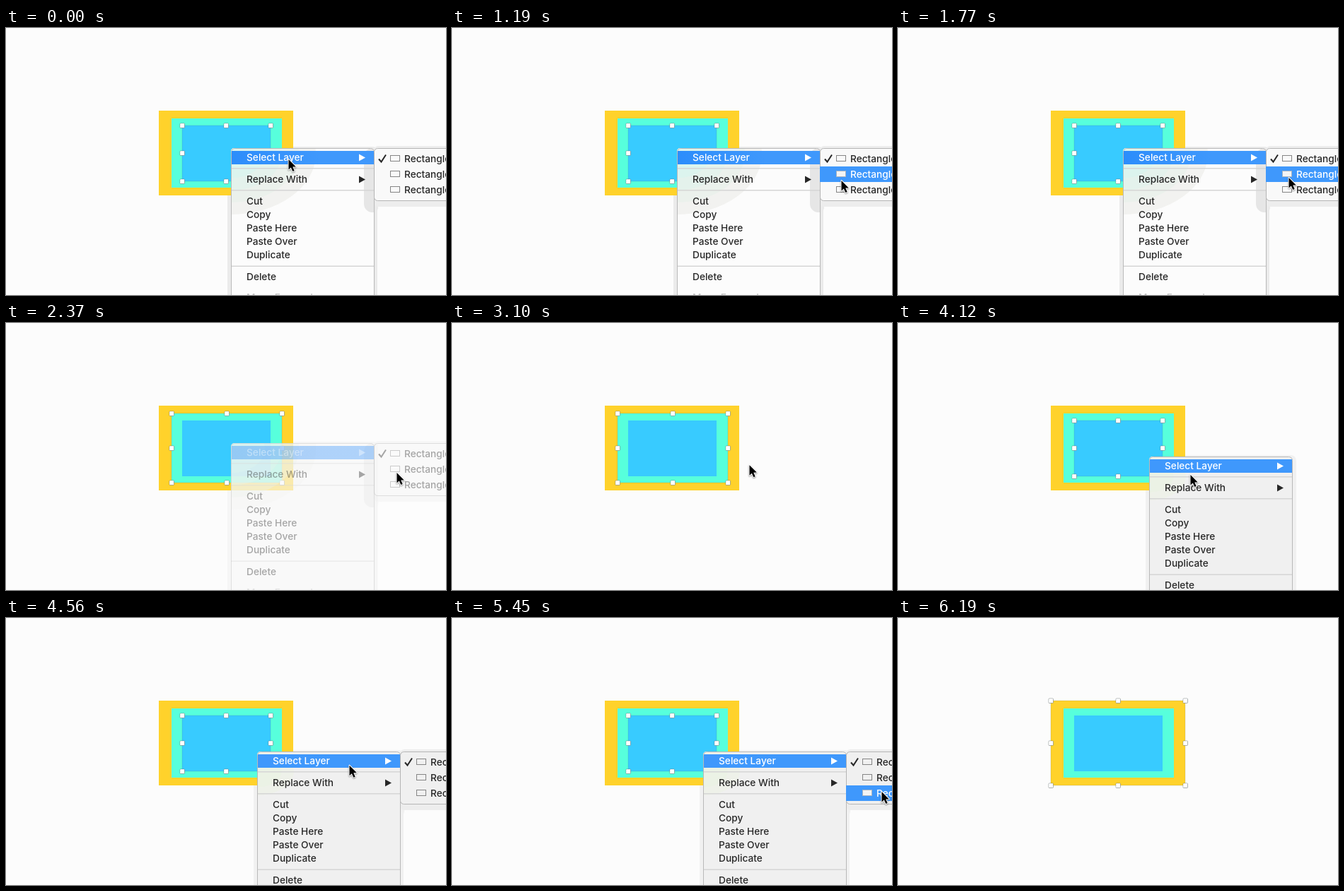
Recreate the animation shown at these times as an HTML page with a canvas. Size 622 px wide and 378 px high, loop 6640 ms.

```html
<!DOCTYPE html>
<html lang="en">
<head>
<meta charset="utf-8">
<style>
  html, body { margin: 0; width: 100%; height: 100%; overflow: hidden; background: #fcfcfc; }
  canvas { display: block; width: 622px; height: 378px; }
</style>
</head>
<body>
<canvas id="stage"></canvas>
<script>
const W = 622, H = 378, LOOP = 6640, TICKS = 45;
const canvas = document.getElementById('stage');
const ctx = canvas.getContext('2d');
const dpr = window.devicePixelRatio || 1;
canvas.width = W * dpr;
canvas.height = H * dpr;

const FONT = '450 13.7px Inter, sans-serif';
const BLUE = '#3f98fc', INK = '#272727', PAPER = '#fcfcfc', PANEL = '#f0f0f0';
const MENU_W = 202, ROW = 22;

const yellow = { x: 216, y: 117, w: 190, h: 120, color: '#ffd22b' };
const mint = { x: 234, y: 128, w: 156, h: 98, color: '#57ffdc' };
const blue = { x: 249, y: 138, w: 125, h: 79, color: '#38cbff' };
const shapes = [yellow, mint, blue];

// Menus open from one tick to another; the clicked row goes dark at `click`
const menus = [
  { x: 318, y: 170, open: 0, expand: 0, click: 15, close: 17, pale: true, picks: mint },
  { x: 355, y: 189, open: 28, expand: 30, click: 38, close: 40, pale: false, picks: yellow }
];

// Key points of the pointer: tick, x, y
const path = [
  [2, 399, 186], [6, 524, 188], [8, 550, 216], [10, 551, 224], [12, 552, 212],
  [18, 552, 212], [20, 436, 204], [25, 356, 190], [27, 356, 190], [28, 413, 215],
  [30, 440, 208], [33, 575, 210], [36, 607, 246], [40, 607, 246], [42, 640, 248]
];

function pointerAt(tick) {
  const next = path.findIndex(key => key[0] > tick);
  if (next < 1) return path.at(next).slice(1);
  const [t0, x0, y0] = path[next - 1], [t1, x1, y1] = path[next];
  const u = (tick - t0) / (t1 - t0);
  return [x0 + (x1 - x0) * u, y0 + (y1 - y0) * u];
}

function rect(x, y, w, h, color) {
  ctx.fillStyle = color;
  ctx.fillRect(x, y, w, h);
}

function rounded(x, y, w, h, r, fill, stroke) {
  ctx.beginPath();
  ctx.roundRect(x, y, w, h, r);
  if (fill) { ctx.fillStyle = fill; ctx.fill(); }
  if (stroke) { ctx.strokeStyle = stroke; ctx.lineWidth = 1; ctx.stroke(); }
}

function polygon(points, fill) {
  ctx.beginPath();
  points.forEach(([x, y]) => ctx.lineTo(x, y));
  ctx.closePath();
  ctx.fillStyle = fill;
  ctx.fill();
}

function label(text, x, y, color = INK) {
  ctx.font = FONT;
  ctx.fillStyle = color;
  ctx.fillText(text, x, y);
}

function arrow(x, y, color) {
  polygon([[x, y - 5], [x + 9, y], [x, y + 5]], color);
}

function select({ x, y, w, h }) {
  ctx.strokeStyle = 'rgba(60,80,90,.14)';
  ctx.lineWidth = 1;
  ctx.strokeRect(x, y, w, h);
  for (const u of [0, .5, 1]) for (const v of [0, .5, 1]) {
    if (u === .5 && v === .5) continue;
    const cx = Math.floor(x + w * u), cy = Math.floor(y + h * v);
    rounded(cx - 3, cy - 3, 6.5, 6.5, 1, '#fff', 'rgba(90,100,100,.5)');
    rect(cx - 2.5, cy - 2.5, 5.5, 5.5, '#fff');
  }
}

function hover({ x, y, w, h }) {
  ctx.strokeStyle = '#4a9ff0';
  ctx.lineWidth = 2;
  ctx.strokeRect(x, y, w, h);
}

function halo({ x, y, pale }, expanded) {
  rounded(x - 5, y - 2, MENU_W + 11, H, 8, pale ? '#ebebeb' : '#f1f1f1');
  if (!expanded) return;
  rounded(x + MENU_W, y - 3, W, 86, 6, '#ededed');
  rounded(x + MENU_W + 5, y + 83, W, H, 6, PAPER);
}

// Stepped blur of the shapes behind the panel
function glow(x, y, rx, ry, colors) {
  colors.forEach((color, i) => {
    const scale = 1 - i / (colors.length + 1);
    ctx.beginPath();
    ctx.ellipse(x, y, rx * scale, ry * scale, 0, 0, Math.PI * 2);
    ctx.fillStyle = color;
    ctx.fill();
  });
}

function drawMenu({ x, y, pale }, expanded) {
  ctx.save();
  ctx.beginPath();
  ctx.roundRect(x, y, MENU_W, H, 5);
  ctx.clip();
  rect(x, y, MENU_W, H, pale ? PAPER : PANEL);
  if (pale) glow(x, y + 8, 120, 86, ['#f2f2f0', '#ebf1ec', '#e4f2ec', '#dcf4ee']);
  else glow(x, y + 28, 52, 34, ['#eef1e9', '#ebf2e5']);
  if (pale && expanded) rounded(x + 188, y, 30, 91, 12, '#e6e6e6');
  for (const dy of [28, 59, 166.5]) rect(x, y + dy, MENU_W, 1.5, '#d6d6d6');
  ctx.restore();
  rounded(x + .5, y + .5, MENU_W, H, 5, null, '#b9b9b9');

  const bar = ctx.createLinearGradient(x, 0, x + 125, 0);
  bar.addColorStop(0, pale ? '#2c8dfb' : BLUE);
  bar.addColorStop(1, BLUE);
  rect(x + 1, y + 4, MENU_W - 1, 19, bar);

  const left = x + 22;
  label('Select Layer', left, y + 18, '#fff');
  label('Replace With', left, y + 49);
  arrow(x + 181, y + 13.5, '#fff');
  arrow(x + 181, y + 44.5, INK);
  ['Cut', 'Copy', 'Paste Here', 'Paste Over', 'Duplicate']
    .forEach((text, i) => label(text, left, y + 80 + i * 19));
  label('Delete', left, y + 187);
  label('Move Forward', left, y + 215.5, '#c4c4c4');
}

function drawSubmenu(x, y, hot, fill) {
  rounded(x + .5, y + .5, W, 74, 5, fill, '#b5b5b5');
  for (let i = 0; i < 3; i++) {
    const cy = y + 15 + i * ROW, active = i === hot;
    if (active) rect(x, cy - 11, W, ROW, BLUE);
    rect(x + 23, cy - 5, 14, 9, active ? '#f4f4f4' : fill);
    ctx.strokeStyle = active ? '#a9b4c0' : '#858585';
    ctx.lineWidth = 1;
    ctx.strokeRect(x + 23.5, cy - 4.5, 13, 8);
    label('Rectangle ' + (3 - i), x + 43, cy + 5, active ? '#fff' : INK);
  }
  ctx.beginPath();
  ctx.moveTo(x + 7, y + 15.5);
  ctx.lineTo(x + 10.5, y + 19.5);
  ctx.lineTo(x + 17, y + 9.5);
  ctx.strokeStyle = hot === 0 ? '#fff' : INK;
  ctx.lineWidth = 2;
  ctx.stroke();
}

function drawPointer(x, y) {
  const outline = [[0, 0], [0, 14.5], [3.3, 11.5], [5.8, 17], [8.2, 16], [5.8, 10.6], [10.3, 10.4]]
    .map(([dx, dy]) => [x + .5 + dx, y + dy]);
  ctx.save();
  ctx.lineJoin = 'round';
  ctx.lineWidth = 2;
  ctx.strokeStyle = '#fff';
  ctx.shadowColor = 'rgba(0,0,0,.35)';
  ctx.shadowBlur = 2 * dpr;
  ctx.shadowOffsetY = dpr;
  polygon(outline, '#000');
  ctx.stroke();
  ctx.restore();
  polygon(outline, '#000');
}

function selectedAt(tick) {
  if (tick > menus[1].click) return menus[1].picks;
  return tick > menus[0].click && tick < menus[1].open ? menus[0].picks : blue;
}

function draw(t) {
  // The small lead keeps rounded step times inside their tick
  const tick = Math.floor((t + 15) / LOOP * TICKS) % TICKS;
  const [px, py] = pointerAt(tick);
  const selected = selectedAt(tick);
  const menu = menus.find(m => tick >= m.open && tick < m.close);
  const expanded = menu && tick >= menu.expand;
  const opacity = menu && tick > menu.click ? .4 : 1;

  ctx.setTransform(dpr, 0, 0, dpr, 0, 0);
  rect(0, 0, W, H, PAPER);
  ctx.globalAlpha = opacity;
  if (menu) halo(menu, expanded);
  ctx.globalAlpha = 1;
  for (const { x, y, w, h, color } of shapes) rect(x, y, w, h, color);

  const under = shapes.findLast(({ x, y, w, h }) => px > x && px < x + w && py > y && py < y + h);
  if (!menu && under && under !== selected) hover(under);
  select(selected);

  if (menu) {
    const subX = menu.x + MENU_W;
    const hot = px > subX && tick < menu.click ? Math.floor((py - menu.y - 4) / ROW) : -1;
    ctx.globalAlpha = opacity;
    drawMenu(menu, expanded);
    if (expanded) drawSubmenu(subX, menu.y, hot, menu.pale ? '#f9f9f9' : PANEL);
    ctx.globalAlpha = 1;
  }
  drawPointer(px, py);
}

const start = performance.now();
function loop() {
  draw((performance.now() - start) % LOOP);
  requestAnimationFrame(loop);
}
loop();
</script>
</body>
</html>
```
